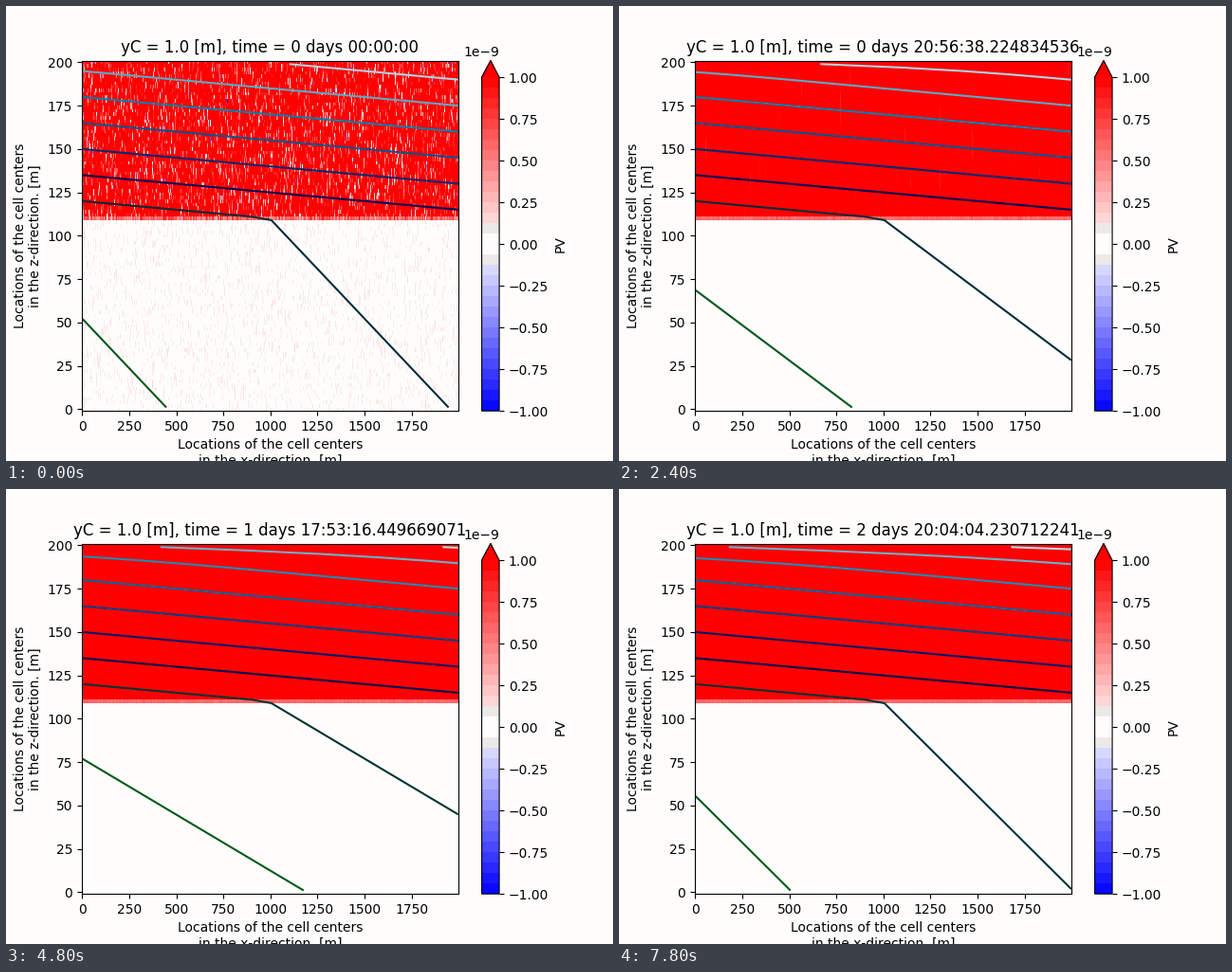
Recreate the animation shown at these times as a matplotlib script. Size 640 px wide and 480 px high, loop 8 s.

```python
import math

import numpy as np
import matplotlib.pyplot as plt
from matplotlib.animation import FuncAnimation
from matplotlib.cm import ScalarMappable
from matplotlib.colors import ListedColormap, Normalize

FRAMES, INTERVAL = 40, 200
STEP_NS = 62831854028779714  # model time per frame, in 1e-4 ns
PAPER = "#fefdfc"
UNIT = 1e-9
erfc = np.vectorize(math.erfc)

# Grid: PV on cell faces, buoyancy on cell centres
xf, zf = np.arange(0, 2000, 4), np.arange(0, 201, 2)
xc, zc = np.linspace(2, 1998, 5), np.arange(1, 200, 2)
X, Z = np.meshgrid(xc, zc)

rng = np.random.default_rng(7)
spectrum = np.fft.rfft(rng.standard_normal((zf.size, xf.size)), axis=0)
wave = np.fft.rfftfreq(zf.size)[:, None]
upper = zf[:, None] > 110
edge = zf[:, None] == 110
pv_mean = np.where(upper, 1.42, np.where(edge, 0.58, 0.02))
pv_noise = np.where(upper, 0.6, np.where(edge, 0.15, 0.035))


def smooth_noise(var):
    return np.fft.irfft(spectrum * np.exp(-2 * (np.pi * wave) ** 2 * var),
                        n=zf.size, axis=0)


noise_scale = smooth_noise(0.36).std()


def pv_field(k):
    """Noise that diffuses vertically around a two-layer PV profile."""
    noise = smooth_noise(0.36 + k) / noise_scale * math.exp(-0.03 * k)
    return (pv_mean + pv_noise * noise) * UNIT


def surface_rise(k):
    """Diffusive boundary layer growing down from the surface."""
    t = max(k - 0.3, 0)
    if t == 0:
        return np.zeros_like(Z)
    width = 2 * math.sqrt(0.7 * t)
    u = (200 - Z) / width
    return 1.87 * width * (np.exp(-u * u) / math.sqrt(math.pi) - u * erfc(u))


def buoyancy(k):
    """Buoyancy in contour units; the lower layer swings inertially."""
    ratio = 8.72 + 3.39 * (1 - math.cos(math.radians(37.77 * k)))
    low = 2 + (X - 1005) / 1500 + (Z - 109) * ratio / 1500
    high = 2 + (X - 900) / 1500 + (Z - 111 + surface_rise(k)) / 15
    return np.where(Z < 110, low, high)


def clock(k):
    ns = (k * STEP_NS + 5000) // 10000
    sec, frac = divmod(ns, 10**9)
    days, sec = divmod(sec, 86400)
    text = f"{days} days {sec // 3600:02d}:{sec // 60 % 60:02d}:{sec % 60:02d}"
    return text + (f".{frac:09d}" if frac else "")


def banded(tint):
    colors = [plt.cm.bwr((i + 0.5) / 32) for i in range(32)]
    colors[15] = colors[16] = PAPER
    colors[14] = colors[17] = tint
    cmap = ListedColormap(colors)
    cmap.set_over("#ff0000")
    return cmap


fig, ax = plt.subplots(figsize=(6.4, 4.8), dpi=100, facecolor=PAPER)
norm = Normalize(-UNIT, UNIT)
bar = fig.colorbar(ScalarMappable(norm, banded("#ece9e9")), ax=ax, extend="max",
                   ticks=np.linspace(-1, 1, 9) * UNIT)
bar.set_label("PV")

mesh = ax.pcolormesh(xf, zf, pv_field(0), shading="nearest", norm=norm,
                     cmap=banded("#fbe9e6"))
ax.set(xlim=(-2, 1998), ylim=(-1, 201),
       xlabel="Locations of the cell centers\nin the x-direction. [m]",
       ylabel="Locations of the cell centers\nin the z-direction. [m]")
ax.set_xticks(range(0, 2000, 250))
ax.set_yticks(range(0, 201, 25))
lines = []


def draw(k):
    while lines:
        lines.pop().remove()
    mesh.set_array(pv_field(k))
    b = buoyancy(k)
    top = math.ceil(b.max())
    lines.append(ax.contour(X, Z, b, levels=range(top + 1), cmap="ocean",
                            vmin=0, vmax=top, linewidths=1.5))
    ax.set(xlim=(-2, 1998), ylim=(-1, 201))
    ax.set_title(f"yC = 1.0 [m], time = {clock(k)}")
    return [mesh]


anim = FuncAnimation(fig, draw, frames=FRAMES, interval=INTERVAL,
                     init_func=lambda: draw(0), repeat=True, repeat_delay=0)
plt.show()
```
